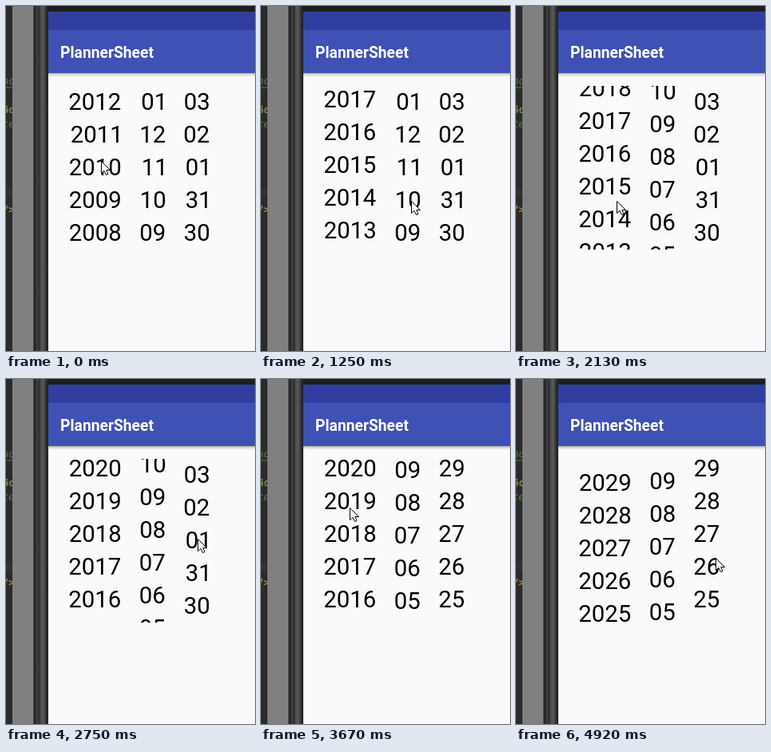
Write an HTML page with a canvas that moves like this. It is 312x432 px and loops after 4960 ms.

```html
<!DOCTYPE html>
<html lang="en">
<head>
<meta charset="utf-8">
<title>Date wheels</title>
<style>
  html, body { margin: 0; width: 100%; height: 100%; overflow: hidden; background: #fafafa; }
  canvas { display: block; width: 312px; height: 432px; }
</style>
</head>
<body>
<canvas id="stage" width="312" height="432"></canvas>
<script>
const ctx = document.getElementById('stage').getContext('2d');
const LOOP = 4960, BEAT = 40;
const ROW = 41, FIRST_ROW = 120, TOP = 100, BOTTOM = 305;

const mix = (a, b, u) => a + (b - a) * u;
const progress = (t, from, to) => Math.min(1, Math.max(0, (t - from) / (to - from)));
const glide = u => u * u * (3 - 2 * u);
// Quick pick-up, then a long slow-down, like a flung list.
const fling = u => 1 - (1 - u) ** 3 * (1 + 3 * u);

const cycle = (n, size) => String((n % size + size) % size + 1).padStart(2, '0');

// Swipes: start, end, distance.
const wheels = [
  { x: 110.5, label: k => String(2012 + k),
    swipes: [[600, 1140, 202], [1985, 2580, 118], [3640, 4475, 387]] },
  { x: 182.4, label: k => cycle(k, 12),
    swipes: [[1360, 1900, -136], [3080, 3360, -34], [4060, 4200, 14]] },
  { x: 238, label: k => cycle(k + 2, 31),
    swipes: [[2720, 3420, -213]] }
];

// Turning points of the pointer: time, x, y.
const pointer = [
  [0, 119, 195], [560, 119, 134], [840, 122, 249], [1240, 188, 245], [1600, 186, 145],
  [1900, 122, 219], [2120, 126, 245], [2280, 128, 281], [2680, 240, 205], [2960, 238, 125],
  [3240, 186, 160], [3640, 111, 162], [3960, 115, 297], [4200, 170, 265], [4920, 250, 225]
];

function box(x, y, w, h, fill) {
  ctx.fillStyle = fill;
  ctx.fillRect(x, y, w, h);
}

function gradient(x0, y0, x1, y1, ...colours) {
  const g = ctx.createLinearGradient(x0, y0, x1, y1);
  colours.forEach((c, i) => g.addColorStop(i / (colours.length - 1), c));
  return g;
}

function text(str, x, y, font, fill) {
  ctx.font = font;
  ctx.fillStyle = fill;
  ctx.fillText(str, x, y);
}

function clipped(x, y, w, h, paint) {
  ctx.save();
  ctx.beginPath();
  ctx.rect(x, y, w, h);
  ctx.clip();
  paint();
  ctx.restore();
}

function drawEditor() {
  const mono = '12px "DejaVu Sans Mono", monospace', green = '#56804a', yellow = '#d0ab5c';
  box(0, 0, 8, 432, '#2b2b2b');
  box(0, 229, 8, 10, '#323232');
  text('Sc', -4, 134, mono, yellow);
  text('/>', -4, 259, mono, yellow);
  ['nc', '', 'er', 'te'].forEach((s, i) => text(s, -4, 98 + 18 * i, 'italic ' + mono, green));
  ctx.strokeStyle = green;
  ctx.lineWidth = 1;
  ctx.beginPath();
  for (let x = 0; x <= 8; x += 2) ctx.lineTo(x, x % 4 ? 101 : 103);
  ctx.stroke();
}

function drawDevice() {
  box(8, 0, 26, 432, '#808080');
  box(34, 0, 278, 432, '#1e1e1e');
  box(34, 0, 19, 432, gradient(34, 0, 53, 0,
    '#4a4a4a', '#1e1e1e', '#444444', '#2c2c2c', '#484848', '#5a5a5a', '#484848', '#2a2a2a', '#222222'));
  box(53, 7, 259, 23, '#303f9f');
  box(53, 30, 259, 54, '#3f51b5');
  box(53, 84, 259, 348, '#fafafa');
  box(53, 84, 259, 5, gradient(0, 84, 0, 89, '#b4b4b4', '#e0e0e0', '#fafafa'));
  text('PlannerSheet', 68, 65, 'bold 19.3px Roboto, sans-serif', '#ffffff');
}

function drawWheel({ x, label, swipes }, t) {
  const offset = swipes.reduce(
    (sum, [from, to, distance]) => sum + distance * fling(progress(t, from, to)), FIRST_ROW);
  const first = Math.ceil((offset - BOTTOM - 12) / ROW);
  const last = Math.floor((offset - TOP + 12) / ROW);
  ctx.font = '29.4px Roboto, sans-serif';
  ctx.fillStyle = '#000000';
  for (let k = first; k <= last; k++) {
    const str = label(k), m = ctx.measureText(str);
    const inkWidth = m.actualBoundingBoxLeft + m.actualBoundingBoxRight;
    ctx.fillText(str, x - inkWidth / 2, offset - k * ROW + 10.2);
  }
}

function drawPointer(t) {
  const next = Math.max(1, pointer.findIndex(p => p[0] >= t));
  const [from, x0, y0] = pointer[next - 1], [to, x1, y1] = pointer[next];
  const u = glide(progress(t, from, to));
  ctx.save();
  ctx.translate(Math.round(mix(x0, x1, u)) + 0.5, Math.round(mix(y0, y1, u)) - 0.5);
  ctx.beginPath();
  [[0, 0], [0, 15], [3.5, 11.8], [6, 17], [8.5, 16], [6.3, 11], [11, 11]]
    .forEach(([x, y]) => ctx.lineTo(x, y));
  ctx.closePath();
  ctx.fillStyle = '#ffffff';
  ctx.fill();
  ctx.strokeStyle = '#000000';
  ctx.lineWidth = 1;
  ctx.stroke();
  ctx.restore();
}

function draw(time) {
  const t = Math.min(Math.floor(time / BEAT) * BEAT, LOOP - BEAT);
  clipped(0, 0, 8, 432, drawEditor);
  drawDevice();
  clipped(53, TOP, 259, BOTTOM - TOP, () => wheels.forEach(w => drawWheel(w, t)));
  drawPointer(t);
}

const start = performance.now();
function tick() {
  draw((performance.now() - start) % LOOP);
  requestAnimationFrame(tick);
}
tick();
</script>
</body>
</html>
```
